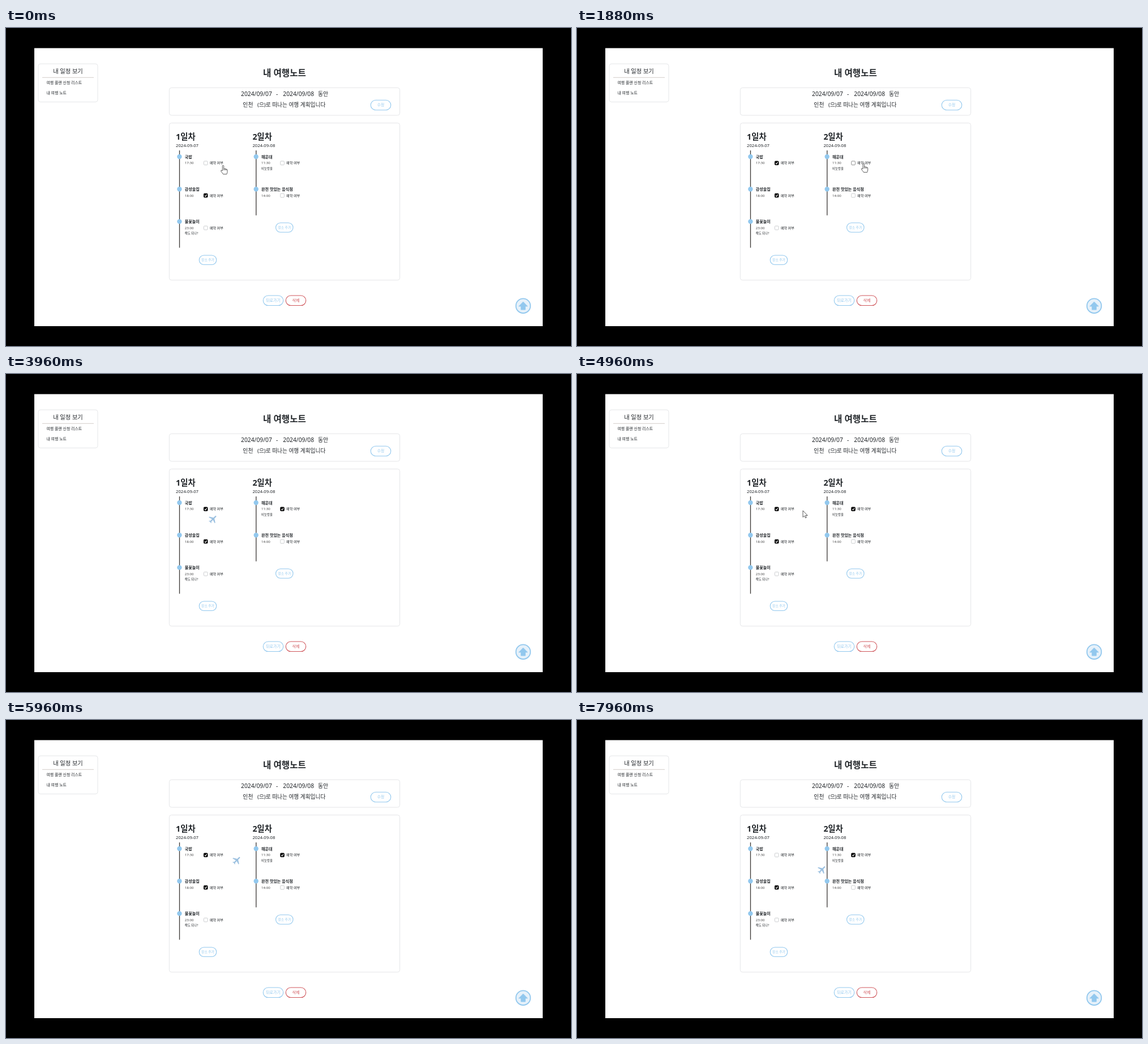
Recreate the animation shown at these times as an HTML page. Size 998x561 px, loop 8 s.

```html
<!DOCTYPE html>
<html lang="ko">
<head>
<meta charset="utf-8">
<style>
html, body { margin: 0; width: 100%; height: 100%; overflow: hidden; background: #000; }
svg { display: block; width: 998px; height: 561px; }
text { font-family: "Noto Sans", "Noto Sans CJK KR", "Noto Sans CJK", sans-serif; white-space: pre; }
</style>
</head>
<body>
<svg id="stage" viewBox="0 0 998 561">
  <rect x="50" y="35.5" width="898" height="490.5" fill="#fff"/>
  <g id="page"></g>
  <g id="pointer">
    <path id="plane" fill="#9bc0e0" transform="translate(8.6 6.4) rotate(45) scale(.78) translate(-11.5 -12)"
      d="M21 16v-2l-8-5V3.5a1.5 1.5 0 0 0-3 0V9l-8 5v2l8-2.5V19l-2 1.5V22l3.5-1 3.5 1v-1.5L13 19v-5.5z"/>
    <g id="hand" fill="#fff" stroke="#333" stroke-width=".8" stroke-linejoin="round">
      <path d="M-1 9V1.2Q-1 0 .2 0T1.4 1.2V6Q2.4 5.2 3.6 6.2Q4.8 5.6 5.7 6.8Q7.7 6.6 7.7 8.6V11Q7.7 13.2 6.5 15.6H.3Q-.9 13.5-3 11.2Q-4.2 9.4-3.2 8.8Q-2.2 8.3-1 9.7Z"/>
      <path d="M1.4 6V8.8M3.6 6.2V8.8M5.7 6.8V8.9" fill="none"/>
    </g>
    <path id="arrow" d="M0 0V11.6L2.7 9.2L4.5 13L6.3 12.2L4.6 8.5H8.2Z" fill="#fff" stroke="#333" stroke-width=".8" stroke-linejoin="round"/>
  </g>
</svg>
<script>
const SVG = "http://www.w3.org/2000/svg";
const BLUE = "#92c8ee", RED = "#d0575c", INK = "#212529";
const page = document.getElementById("page");

function add(tag, attrs) {
  const el = document.createElementNS(SVG, tag);
  for (const key in attrs) el.setAttribute(key, attrs[key]);
  return page.appendChild(el);
}

// y is the vertical middle of the line
function label(x, y, size, content, extra = {}) {
  add("text", { x, y: y + size * 0.36, "font-size": size, fill: INK, ...extra }).textContent = content;
}

function panel(x, y, width, height) {
  add("rect", { x, y, width, height, rx: 4, fill: "#fff", stroke: "#e2e4e6", "stroke-width": 0.9 });
}

function button(cx, cy, width, height, size, content, color = BLUE) {
  add("rect", { x: cx - width / 2, y: cy - height / 2, width, height, rx: height / 2,
    fill: "#fff", stroke: color, "stroke-width": 1.1 });
  label(cx, cy - 0.2, size, content, { fill: color, "text-anchor": "middle", "font-weight": 500 });
}

function checkbox(x, y) {
  const box = add("rect", { x, y, width: 6.7, height: 6.7, rx: 1.3, "stroke-width": 0.8 });
  const tick = add("path", { d: `M${x + 1.5} ${y + 3.5}l1.4 1.5 2.5-3.2`, fill: "none", stroke: "#fff", "stroke-width": 1.1 });
  return (checked, hovered = false) => {
    box.setAttribute("fill", checked ? "#000" : "#fff");
    box.setAttribute("stroke", checked ? "#000" : hovered ? "#777" : "#bfc2c5");
    tick.style.display = checked ? "" : "none";
  };
}

function day(x, name, date, places) {
  const step = 57.2;
  label(x, 192, 14.3, name, { "font-weight": 700 });
  label(x, 207.5, 7.65, date);
  add("path", { d: `M${x + 6.4} 216V${216 + step * places.length}`, stroke: "#3a3633", "stroke-width": 1.3 });
  const boxes = places.map(([title, time, memo], i) => {
    const y = 227 + step * i;
    add("circle", { cx: x + 6.3, cy: y, r: 4.2, fill: BLUE });
    label(x + 15.7, y, 7.05, title, { "font-weight": 700 });
    label(x + 15.7, y + 11.3, 6.1, time, { fill: "#444" });
    label(x + 59.6, y + 11.1, 6.15, "예약 여부");
    if (memo) label(x + 15.7, y + 20.6, 5.4, memo);
    return checkbox(x + 49.3, y + 7.9);
  });
  button(x + 56.4, 237.6 + step * places.length, 30.5, 16.5, 5.8, "장소 추가");
  return boxes;
}

panel(57, 63.2, 105, 67.3);
label(109.5, 76, 10.3, "내 일정 보기", { "text-anchor": "middle" });
add("path", { d: "M64 87.3H155", stroke: "#cfc8c4", "stroke-width": 0.9 });
label(71.4, 96, 6.95, "여행 플랜 신청 리스트", { "font-weight": 500 });
label(71.4, 114, 6.95, "내 여행 노트", { "font-weight": 500 });

label(492, 79, 15.6, "내 여행노트", { "text-anchor": "middle", "font-weight": 700 });
panel(288.4, 105.4, 407.2, 48.6);
const medium = { "font-weight": 500 };
label(415, 116.5, 10.3, "2024/09/07", medium);
label(477, 116.5, 10.3, "-", medium);
label(489.3, 116.5, 10.3, "2024/09/08", medium);
label(551, 116.5, 9.9, "동안", medium);
label(418.3, 135.5, 9.9, "인천", medium);
label(444, 135.5, 9.7, "(으)로 떠나는 여행 계획입니다", medium);
button(662, 136, 35.5, 17.5, 6.8, "수정");

panel(288.4, 167.6, 407.2, 277.2);
const first = day(300.1, "1일차", "2024-09-07", [
  ["국밥", "17:30"], ["감성술집", "18:00"], ["불꽃놀이", "23:00", "해도 되나?"]]);
const second = day(435.4, "2일차", "2024-09-08", [
  ["해운대", "11:30", "비눗방울"], ["완전 맛있는 음식점", "14:00"]]);
button(472, 480.8, 35.5, 17.5, 7, "뒤로가기");
button(512, 480.8, 35.5, 17.5, 7.1, "삭제", RED);

add("circle", { cx: 913.5, cy: 490.2, r: 12.8, fill: "#e6f1fa", stroke: BLUE, "stroke-width": 1.8 });
add("path", { d: "M913.5 483L921.3 491H917.3V497H909.7V491H905.7Z", fill: BLUE, stroke: BLUE,
  "stroke-width": 0.8, "stroke-linejoin": "round" });

// pointer hot spot: time, x, y
const route = [
  [0, 383.3, 242.3], [750, 383.3, 242.3], [1650, 506, 239], [2160, 506, 239], [2450, 508, 258],
  [3120, 493, 195.5], [3740, 372, 261], [3960, 357, 249.5], [4450, 399, 241],
  [6800, 399, 241], [7080, 380, 239], [7480, 380, 239], [7960, 424, 257.5], [8000, 424, 257.5]];
// each pointer shape holds until its time
const shapes = [[840, "hand"], [1520, "plane"], [2260, "hand"], [4500, "plane"],
  [5400, "arrow"], [7000, "plane"], [7560, "hand"], [8000, "plane"]];
const pointer = document.getElementById("pointer");
const kinds = ["hand", "plane", "arrow"].map(id => document.getElementById(id));

function draw(t) {
  const i = route.findIndex(([time]) => time > t);
  const [t0, x0, y0] = route[i - 1], [t1, x1, y1] = route[i];
  const u = (t - t0) / (t1 - t0), k = u * u * (3 - 2 * u);
  pointer.setAttribute("transform", `translate(${x0 + (x1 - x0) * k} ${y0 + (y1 - y0) * k})`);
  const shape = shapes.find(([end]) => t < end)[1];
  for (const el of kinds) el.style.display = el.id === shape ? "" : "none";

  first[0](t >= 400 && t < 7300);
  first[1](true);
  first[2](false);
  second[0](t >= 2120, t >= 1520);
  second[1](false);
}

function frame() {
  draw(performance.now() % 8000);
  requestAnimationFrame(frame);
}
frame();
</script>
</body>
</html>
```
